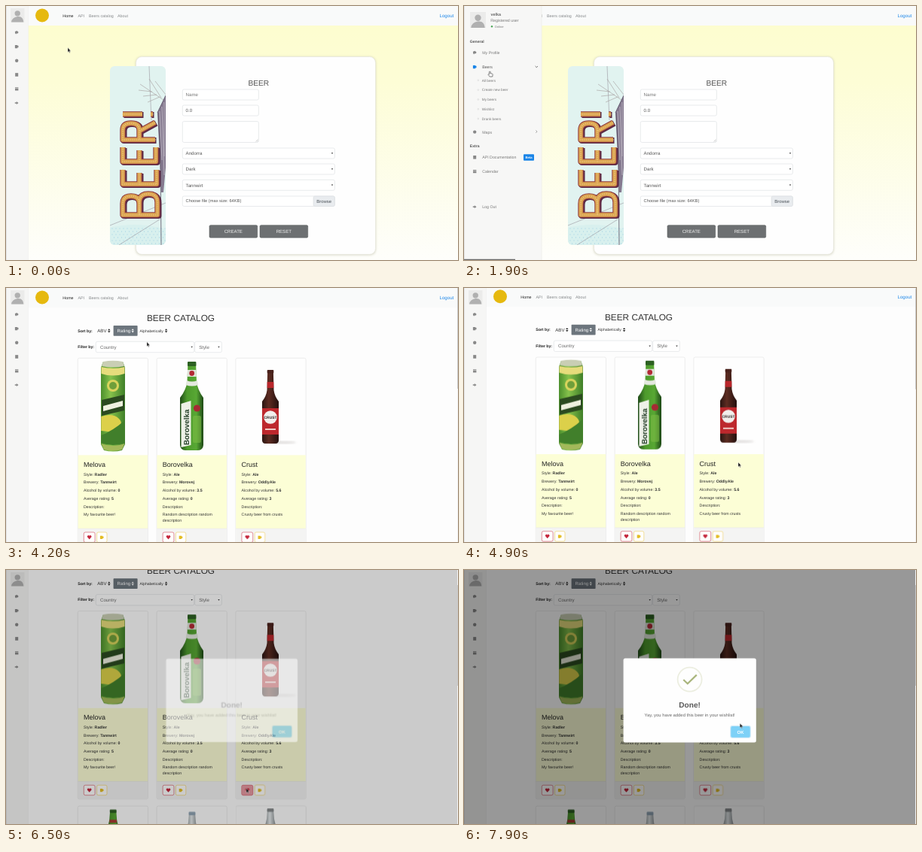
Animation of 600x338 px, one loop 8000 ms. Source, as an HTML page:

```html
<!DOCTYPE html>
<html lang="en">
<head>
<meta charset="utf-8">
<title>Beer catalog</title>
<style>
html, body { margin: 0; width: 100%; height: 100%; overflow: hidden; background: #fefefd; }
svg { display: block; width: 600px; height: 338px; }
text { font-family: "Liberation Sans", Arial, sans-serif; text-rendering: geometricPrecision; white-space: pre; }
</style>
</head>
<body>
<svg id="stage" viewBox="0 0 600 338" xmlns="http://www.w3.org/2000/svg">
  <defs>
    <linearGradient id="sun" x1="0" y1="0" x2="0" y2="1">
      <stop offset="0" stop-color="#fdfdcd"/>
      <stop offset=".3" stop-color="#fdfdd6"/>
      <stop offset="1" stop-color="#fefefb"/>
    </linearGradient>
    <linearGradient id="can" x1="0" x2="1">
      <stop offset="0" stop-color="#4c8f2c"/>
      <stop offset=".4" stop-color="#86c24c"/>
      <stop offset="1" stop-color="#3f7f28"/>
    </linearGradient>
    <linearGradient id="green" x1="0" x2="1">
      <stop offset="0" stop-color="#1f4a18"/>
      <stop offset=".3" stop-color="#4d9a2c"/>
      <stop offset=".7" stop-color="#58a834"/>
      <stop offset="1" stop-color="#1d4816"/>
    </linearGradient>
    <linearGradient id="brown" x1="0" x2="1">
      <stop offset="0" stop-color="#2a1512"/>
      <stop offset=".4" stop-color="#5d2c22"/>
      <stop offset="1" stop-color="#24100e"/>
    </linearGradient>
    <linearGradient id="glass" x1="0" x2="1">
      <stop offset="0" stop-color="#777f82"/>
      <stop offset=".45" stop-color="#e6ebec"/>
      <stop offset="1" stop-color="#72797c"/>
    </linearGradient>
    <filter id="soft" x="-10%" y="-10%" width="120%" height="120%"><feGaussianBlur stdDeviation="1.6"/></filter>
    <clipPath id="photoClip"><rect x="138" y="80" width="74" height="238" rx="6"/></clipPath>
    <clipPath id="panelClip"><rect id="panelEdge" width="103.5" height="338"/></clipPath>
    <clipPath id="subClip"><rect id="subEdge" y="90" width="104" height="68"/></clipPath>
  </defs>
</svg>
<script>
const LOOP = 8000;
const stage = document.getElementById('stage');

// ---------- drawing helpers ----------
function add(parent, tag, attrs = {}, content) {
  const node = document.createElementNS('http://www.w3.org/2000/svg', tag);
  for (const key in attrs) node.setAttribute(key, attrs[key]);
  if (content !== undefined) node.textContent = content;
  parent.append(node);
  return node;
}
const group = (p, attrs) => add(p, 'g', attrs);
const at = (p, x, y) => group(p, { transform: `translate(${x} ${y})` });
const box = (p, x, y, width, height, fill, more) => add(p, 'rect', { x, y, width, height, fill, ...more });
const dot = (p, cx, cy, r, fill, more) => add(p, 'circle', { cx, cy, r, fill, ...more });
const shape = (p, d, fill, more) => add(p, 'path', { d, fill, ...more });
const line = (p, d, stroke, width, more) =>
  shape(p, d, 'none', { stroke, 'stroke-width': width, ...more });
const label = (p, x, y, size, str, fill = '#333', more) =>
  add(p, 'text', { x, y, 'font-size': size, fill, ...more }, str);
const BOLD = { 'font-weight': 'bold' };
const MID = { 'text-anchor': 'middle' };
const framed = (p, x, y, w, h, fill = '#fff', stroke = '#d6dade', rx = 2) =>
  box(p, x, y, w, h, fill, { stroke, 'stroke-width': .55, rx });

// rows: [ms, value, easing?]; hard = jump from one value to the next
function play(node, prop, rows, hard) {
  const all = [...rows];
  if (all[0][0] > 0) all.unshift([0, all[0][1]]);
  all.push([LOOP, all[all.length - 1][1]]);
  node.animate(all.map(([ms, value, easing]) => ({
    offset: ms / LOOP, [prop]: value, easing: hard ? 'steps(1, end)' : easing || 'linear'
  })), { duration: LOOP, iterations: Infinity });
}
const show = (node, from, to = LOOP) => {
  const rows = [[from, 1]];
  if (from > 0) rows.unshift([0, 0]);
  if (to < LOOP) rows.push([to, 0]);
  play(node, 'opacity', rows, true);
};

// ---------- icons ----------
const ICON = {
  tag: 'M-2.3-1.2L.3-2.3 2.4-.4 1.6 1.2H-.2L-1 2.2-2 1.2z',
  mug: 'M-2.3-2H1v.8H2.3v2.4H1V2.2H-2.3z',
  globe: 'M-2.2 0a2.2 2.2 0 1 0 4.4 0a2.2 2.2 0 1 0-4.4 0z',
  book: 'M-2-2.3H2V2.3H-2z',
  date: 'M-2.2-2H2.2V-.9H-2.2zM-2.2-.4H2.2V2.2H-2.2z',
  exit: 'M-2.4-.8H-.4V-2L2.4 0-.4 2V.8H-2.4z',
  heart: 'M0 2.7L-2.6-.1A1.5 1.5 0 0 1 0-1.8A1.5 1.5 0 0 1 2.6-.1z',
  sort: 'M-1.7-.5L0-2.6 1.7-.5zM-1.7.5L0 2.6 1.7.5z',
  down: 'M-1.2-.8H1.2L0 1z'
};
const icon = (p, name, x, y, fill = '#888') => shape(at(p, x, y), ICON[name], fill);

function avatar(p, x, y, s) {
  const g = at(p, x, y);
  box(g, 0, 0, s, s, '#ebebea');
  dot(g, s * .5, s * .37, s * .2, '#b0b0b0');
  shape(g, `M${s * .06} ${s}Q${s * .1} ${s * .66} ${s * .5} ${s * .6}T${s * .94} ${s}z`, '#b0b0b0');
}

function navbar(p) {
  box(p, 0, 0, 600, 26, '#f9fafa');
  dot(p, 48, 12.5, 9, '#e6b90f');
  [['Home', 75.3, '#222'], ['API', 95.5], ['Beers catalog', 110], ['About', 148]]
    .forEach(([str, x, fill = '#85888a']) => label(p, x, 15, 5.35, str, fill));
  label(p, 575.6, 15, 6.1, 'Logout', '#1a85e8');
}

// ---------- form page ----------
const form = group(stage);
box(form, 0, 0, 600, 338, 'url(#sun)');
navbar(form);
box(form, 172, 67.5, 319, 264, '#c9c9b4', { rx: 8, filter: 'url(#soft)', opacity: .7 });
box(form, 172.5, 67.5, 318, 263, '#fefefe', { rx: 8, stroke: '#e4e4da', 'stroke-width': .6 });

const photo = group(form, { 'clip-path': 'url(#photoClip)' });
box(photo, 138, 80, 74, 238, '#e1f3f0');
shape(photo, 'M138 295Q175 286 212 297V318H138z', '#d8f0ee');
for (let i = 0; i < 90; i++) {
  const row = Math.floor(i / 15);
  dot(photo, 141 + (i % 15) * 5 + (row % 2) * 2.5, 296 + row * 4, .5, '#8cc4de');
}
line(photo, 'M190 80L193 152M138 292L212 262M150 318L204 284', '#8b828e', .5);
line(photo, 'M212 127L178 104M200 118L182 120M206 122L190 97M194 114L176 112M212 118L198 100M204 121L188 128', '#a39a9b', .6);
shape(photo, 'M212 119L201 142 204 200 206 248 209 248 212 215z', '#857a90');
line(photo, 'M204 140L207 205M207 134L210 225M210 128V200', '#cfc9d2', .7);
line(photo, 'M201 142L212 119M202 142L205 200 206 318', '#564b60', .8);
const sign = group(photo, { transform: 'translate(151 283) rotate(-90)', 'stroke-linejoin': 'round' });
const letters = 'M5 4V50H22q11 0 11-12t-11-12H5H20q10 0 10-11t-10-11z' +
  'M65 4H46V49H65M46 26H61M95 4H76V48H95M76 26H91' +
  'M105 47V4H118q9 0 9 11t-9 11H105M117 27L128 47M139 4V30M139 41V44';
line(sign, letters, '#5a2a44', 8, { transform: 'translate(-1 1.5)' });
line(sign, letters, '#8f3a3f', 7.4);
line(sign, letters, '#dba451', 5.4);
line(sign, letters, '#efcb80', 1.4, { 'stroke-dasharray': '.1 2.6', 'stroke-linecap': 'round' });

label(form, 335.3, 105.6, 10.2, 'BEER', '#555', MID);
function field(y, h, w, str, fill = '#555', arrow) {
  framed(form, 234.3, y, w, h);
  label(form, 238.6, y + 9.2, 6.15, str, fill);
  if (arrow) icon(form, 'down', 433, y + 7, '#333');
}
field(111, 14, 101, 'Name', '#777');
field(132, 14, 101, '0.0');
field(153.5, 28, 101, '');
line(form, 'M331.5 180.5L334.5 177.5M333.2 180.7L334.7 179.2', '#888', .4);
field(189, 14, 202, 'Andorra', '#555', true);
field(210, 14, 202, 'Dark', '#555', true);
field(231.3, 14, 202, 'Tannwirt', '#555', true);
framed(form, 234.3, 253, 202, 13.5);
framed(form, 408, 253, 28.3, 13.5, '#e9ecef');
label(form, 238.6, 261.4, 5.72, 'Choose file (max size: 64KB)', '#555');
label(form, 422.2, 261.6, 5.9, 'Browse', '#495057', MID);
[[270, 'CREATE'], [337, 'RESET']].forEach(([x, str]) => {
  framed(form, x, 291.7, 63.7, 16.6, '#6d7072', '#55585b', 1.5);
  label(form, x + 31.8, 302.3, 6.1, str, '#f4f4f4', MID);
});

const blank = box(stage, 0, 0, 600, 338, '#fefefd');
show(blank, 3000);

// ---------- catalog page ----------
const catalog = group(stage);
show(catalog, 3300);
const page = group(catalog);
box(page, 0, 0, 600, 400, '#fdfdfd');
navbar(page);
label(page, 187, 44.2, 11.8, 'BEER CATALOG', '#333');
label(page, 95.2, 58.6, 5.2, 'Sort by:', '#222', BOLD);
label(page, 121.3, 58.9, 6.1, 'ABV', '#333');
icon(page, 'sort', 136.8, 56.8, '#222');
box(page, 142.6, 50, 32, 13.8, '#6c757d', { rx: .8 });
label(page, 147.6, 59, 6.1, 'Rating', '#fff');
icon(page, 'sort', 168.2, 56.8, '#fff');
label(page, 177.6, 58.7, 5.05, 'Alphabetically', '#333');
icon(page, 'sort', 212.6, 56.8, '#222');
label(page, 95.2, 80, 5.2, 'Filter by:', '#222', BOLD);
framed(page, 119.3, 71.3, 130.4, 14.4);
label(page, 125, 80.7, 6.15, 'Country', '#666');
icon(page, 'down', 246.7, 78.5, '#333');
framed(page, 250.7, 71.3, 35.6, 14.4);
label(page, 256.2, 80.7, 6.15, 'Style', '#666');
icon(page, 'down', 282.5, 78.5, '#333');

const beers = [
  ['Melova', 'Radler', 'Tannwirt', '0', '5', ['My favourite beer!']],
  ['Borovelka', 'Ale', 'Morovej', '3.5', '0', ['Random description random', 'description']],
  ['Crust', 'Ale', 'OddlyAle', '5.6', '3', ['Crusty beer from crusts']]
];
let hot;
beers.forEach(([name, style, brewery, abv, rating, notes], i) => {
  const g = at(page, i * 104.8, 0);
  framed(g, 95.3, 93.3, 93.2, 250.2, '#fefefe', '#e0e0e0');
  box(g, 95.6, 222.4, 92.6, 97.8, '#fcfed6');
  box(g, 95.6, 320.2, 92.6, 23, '#f4f4f3');
  line(g, 'M95.6 320.2H188.2', '#e2e2e2', .5);
  label(g, 103, 237.8, 9, name, '#222');
  [['Style: ', style], ['Brewery: ', brewery], ['Alcohol by volume: ', abv],
    ['Average rating: ', rating], ['Description:', '']].forEach(([key, value], n) => {
    const row = label(g, 103, 249.7 + n * 10.7, 5.25, key, '#333');
    add(row, 'tspan', BOLD, value);
  });
  notes.forEach((str, n) => label(g, 103, 303.2 + n * 7.6, 5.25, str, '#333'));
  framed(g, 103.3, 325, 14.8, 13.4, '#fefefe', '#d0384a');
  hot = box(g, 103.3, 325, 14.8, 13.4, '#d0384a', { rx: 2, opacity: 0 });
  icon(g, 'heart', 110.7, 331.7, '#c4263c');
  framed(g, 120.6, 325, 13.4, 13.4, '#fefefe', '#ecc94a');
  icon(g, 'mug', 127.2, 331.7, '#e3bd25');
  framed(g, 95.3, 352.8, 93.2, 60, '#fefefe', '#e0e0e0');
});
play(hot, 'opacity', [[6050, 0], [6150, .6], [6550, .5], [6750, 0]]);

// product pictures
const goods = group(page);
show(goods, 3500);
shape(goods, 'M129 98H155L158 106V208L154 216Q142 219 130 216L126 208V106z', 'url(#can)');
shape(goods, 'M129 98Q142 95.5 155 98L157 104Q142 107 127 104z', '#c9ceb4');
shape(goods, 'M126.5 105Q142 109 157.5 105V114Q142 119 126.5 114z', '#e6dc7c');
dot(goods, 142, 130, 8, '#d9d45c');
dot(goods, 142, 130, 5, '#6f9f3a');
shape(goods, 'M127 149L157 142V163L127 170z', '#2b4a20');
shape(goods, 'M129 157L155 150V157L129 164z', '#eef0df');
shape(goods, 'M126.3 171Q142 166 150 174T144 192L126.3 190z', '#dcd04a');
shape(goods, 'M126.3 196Q142 190 157.7 176V206Q142 212 126.3 206z', '#417f2b');
shape(goods, 'M126.5 207Q142 213 157.5 207L154 215Q142 218 130 215z', '#a3b95a');

shape(goods, 'M241.5 99H252L253 124Q254 135 262 146V209Q261.5 215.5 255 216H238Q231.5 215.5 231 209V146Q239.5 135 240.5 124z', 'url(#green)');
box(goods, 241, 98, 11.4, 6, '#2c5f22', { rx: 1 });
shape(goods, 'M240.9 109H252.5L252.8 118H240.6z', '#dfe4da');
dot(goods, 246.7, 113.5, 3.4, '#b32a35');
shape(goods, 'M239.8 123Q247 126 254 123L255 129Q247 132 238.6 129z', '#e4e9df');
shape(goods, 'M232.5 154L245.5 150V209L232.5 212z', '#eef1e8');
label(goods, 0, 0, 9.8, 'Borovelka', '#26402a', { ...BOLD, transform: 'translate(242.7 209) rotate(-90)' });
dot(goods, 253.5, 160, 4.6, '#a52a33');
box(goods, 248, 170, 11, 36, '#7cbb45', { rx: 2, opacity: .6 });

add(goods, 'ellipse', { cx: 364, cy: 205.5, rx: 21, ry: 1.8, fill: '#dedbda', filter: 'url(#soft)' });
shape(goods, 'M347.2 110H354.8L355.5 136Q356.5 144 362 151V203Q361.5 207 358 207H344Q340.5 207 340 203V151Q345.5 144 346.5 136z', 'url(#brown)');
box(goods, 346.7, 109, 8.6, 4.5, '#49211c', { rx: 1 });
box(goods, 346.7, 125, 8.6, 8, '#b9272c');
box(goods, 340, 160, 22, 35, '#bd282d');
dot(goods, 351, 172, 8.8, '#f2efec');
label(goods, 351, 173.8, 4.9, 'CRUST', '#2b2020', { ...BOLD, ...MID });
box(goods, 344, 187, 14, 2, '#efc9c4');

[[142.2, 'url(#green)', '#2c5f22', 357.5], [247, 'url(#glass)', '#8fa3b4', 360.5], [351, 'url(#glass)', '#85898b', 356]]
  .forEach(([x, fill, cap, y]) => {
    const g = at(goods, x, y);
    shape(g, 'M-4 1H4L5 14Q6 20 8.5 26V45H-8.5V26Q-6 20-5 14z', fill);
    box(g, -4.4, 0, 8.8, 4.5, cap, { rx: 1 });
  });
box(goods, 137.4, 371, 9.6, 4, '#a83a32');

play(page, 'transform', [[4850, 'translateY(0)', 'ease-in-out'], [5250, 'translateY(-38.7px)']]);

// ---------- sidebar, narrow ----------
const rail = group(stage);
play(rail, 'opacity', [[0, 1], [500, 0], [3300, 1]], true);
box(rail, 0, 0, 29.7, 338, '#f6f6f5');
line(rail, 'M29.7 0V338', '#ececea', .5);
avatar(rail, 6, 3, 18.5);
['tag', 'mug', 'globe', 'book', 'date', 'exit'].forEach((name, i) => icon(rail, name, 14.2, 35.2 + i * 18.75));

// ---------- sidebar, wide ----------
const panel = group(stage, { 'clip-path': 'url(#panelClip)' });
show(panel, 500, 3000);
play(document.getElementById('panelEdge'), 'transform',
  [[500, 'scaleX(.29)', 'ease-out'], [800, 'scaleX(1)']]);
box(panel, 0, 0, 103.2, 338, '#f7f7f6');
line(panel, 'M103 0V338', '#e6e6e2', .5);
avatar(panel, 8, 8, 21);
label(panel, 35.4, 13, 5.4, 'velka', '#666', BOLD);
label(panel, 35.2, 21, 5.3, 'Registered user', '#777');
dot(panel, 37, 27.2, 1.2, '#4ba657');
label(panel, 40.8, 28.7, 4, 'Online', '#777');
label(panel, 7.8, 49, 5.1, 'General', '#555', BOLD);
function item(p, name, y, str, fill = '#777') {
  label(p, 24.2, y + 2, 5.25, str, fill);
  return icon(p, name, 14.2, y);
}
item(panel, 'tag', 62, 'My Profile');
const active = item(panel, 'mug', 81, 'Beers', '#555');
play(active, 'fill', [[0, '#888'], [1100, '#1a85e8']], true);
const closed = line(panel, 'M95.4 79.2L97 80.8 95.4 82.4', '#555', .8);
const opened = line(panel, 'M94.6 80L96.3 81.7 98 80', '#555', .8);
show(closed, 0, 1400);
show(opened, 1400);

const sub = group(panel, { 'clip-path': 'url(#subClip)' });
const subEdge = document.getElementById('subEdge');
subEdge.style.transformOrigin = '0 90px';
play(subEdge, 'transform', [[1400, 'scaleY(0)', 'ease-out'], [1700, 'scaleY(1)']]);
['All beers', 'Create new beer', 'My beers', 'Wishlist', 'Drank beers'].forEach((str, i) => {
  const y = 98.8 + i * 12.8;
  const ring = dot(sub, 18.8, y, .9, 'none', { stroke: '#c4c4c4', 'stroke-width': .4 });
  label(sub, 23.8, y + 1.7, 4.7, str, '#777');
  if (!i) play(ring, 'stroke', [[0, '#c4c4c4'], [2100, '#1a85e8']], true);
});

const lower = group(panel);
play(lower, 'transform', [[1400, 'translateY(-67px)', 'ease-out'], [1700, 'translateY(0)']]);
item(lower, 'globe', 167.6, 'Maps');
line(lower, 'M95.4 165.6L97 167.2 95.4 168.8', '#777', .7);
label(lower, 7.8, 188.2, 5.1, 'Extra', '#555', BOLD);
item(lower, 'book', 201.3, 'API Documentation');
box(lower, 79, 197.3, 14, 8.4, '#1a85e8', { rx: 1 });
label(lower, 86, 203, 4.2, 'Beta', '#fff', { ...BOLD, ...MID });
item(lower, 'date', 220, 'Calendar');
item(lower, 'exit', 267.3, 'Log Out');

box(stage, 0, 0, .8, 338, '#dcdcdc');

// ---------- dialog ----------
const shade = box(stage, 0, 0, 599, 338, '#000');
play(shade, 'opacity', [[6350, 0], [6650, .4]]);
const modal = group(stage);
modal.style.transformOrigin = '299.7px 173.5px';
play(modal, 'opacity', [[6330, 0], [6630, 1]]);
play(modal, 'transform', [[6330, 'scale(.95)', 'ease-out'], [6600, 'scale(1)']]);
box(modal, 211.6, 117.6, 176.2, 112, '#fefefe', { rx: 2.5 });
const badge = group(modal);
show(badge, 6600);
dot(badge, 299.6, 145.6, 16, 'none', { stroke: '#eceee0', 'stroke-width': 1.8 });
const tick = line(badge, 'M291.3 146L296.8 151.2 308.8 139.6', '#a9b57c', 2.2,
  { pathLength: 100, 'stroke-dasharray': '100 120' });
play(tick, 'strokeDashoffset', [[6700, 101, 'ease-out'], [7050, 0]]);
show(tick, 6700);
const words = group(modal);
play(words, 'opacity', [[6330, 0], [6500, .5], [6650, 1]]);
label(words, 299.6, 182.8, 10.1, 'Done!', '#595959', { ...BOLD, ...MID });
label(words, 299.6, 195.1, 5.9, 'Yay, you have added this beer in your wishlist!', '#666', MID);
box(modal, 353.2, 206.8, 27.6, 17, '#cfe9f7', { rx: 3 });
box(modal, 354.3, 207.9, 25.4, 14.8, '#7dd1f7', { rx: 2 });
label(modal, 367, 217.5, 6, 'OK', '#fff', { ...BOLD, ...MID });

// ---------- scrollbar, status line and pointer ----------
const scrollbar = group(stage);
show(scrollbar, 3300);
box(scrollbar, 599, 0, 1, 338, '#f1f1f1');
const thumb = box(scrollbar, 599, 20, 1, 134, '#c8c8c8');
play(thumb, 'transform', [[4850, 'translateY(-20px)', 'ease-in-out'], [5250, 'translateY(0)']]);

const status = box(stage, 0, 336.8, 1, 1.2, '#6a6a6a');
play(status, 'transform', [[0, 0], [1200, 68], [2100, 53], [3300, 0]].map(([ms, w]) => [ms, `scaleX(${w})`]), true);

const pointer = group(stage);
const arrow = shape(pointer, 'M0 0V5.9L1.4 4.7 2.3 6.8 3.2 6.4 2.3 4.4H4.1z', '#111', { stroke: '#fff', 'stroke-width': .35 });
const hand = shape(pointer, 'M-.8.5Q0-.6.8.5V2.6L3.2 3.2Q4.1 3.6 3.9 4.6L3.3 7H-.1L-2.2 4.2Q-2 3.2-.8 4z', '#fff', { stroke: '#222', 'stroke-width': .6 });
play(arrow, 'opacity', [[0, 1], [1100, 0], [2800, 1]], true);
show(hand, 1100, 2800);
play(pointer, 'transform', [
  [0, 82, 55.5], [100, 82, 55.5], [500, 25, 66], [900, 27, 74], [1200, 33, 80], [1700, 34, 82],
  [1900, 34.3, 87], [2300, 34.5, 98], [3800, 34.5, 98.5], [4000, 92, 86], [4200, 186.5, 71.5],
  [4450, 290, 132], [4700, 366, 226], [4900, 364, 232], [5400, 351.5, 239.7], [5700, 351.5, 239.7],
  [6100, 319, 290.5], [7200, 319, 290.5], [7500, 350, 240], [7800, 366.3, 204]
].map(([ms, x, y]) => [ms, `translate(${x}px, ${y}px)`]));
</script>
</body>
</html>
```
